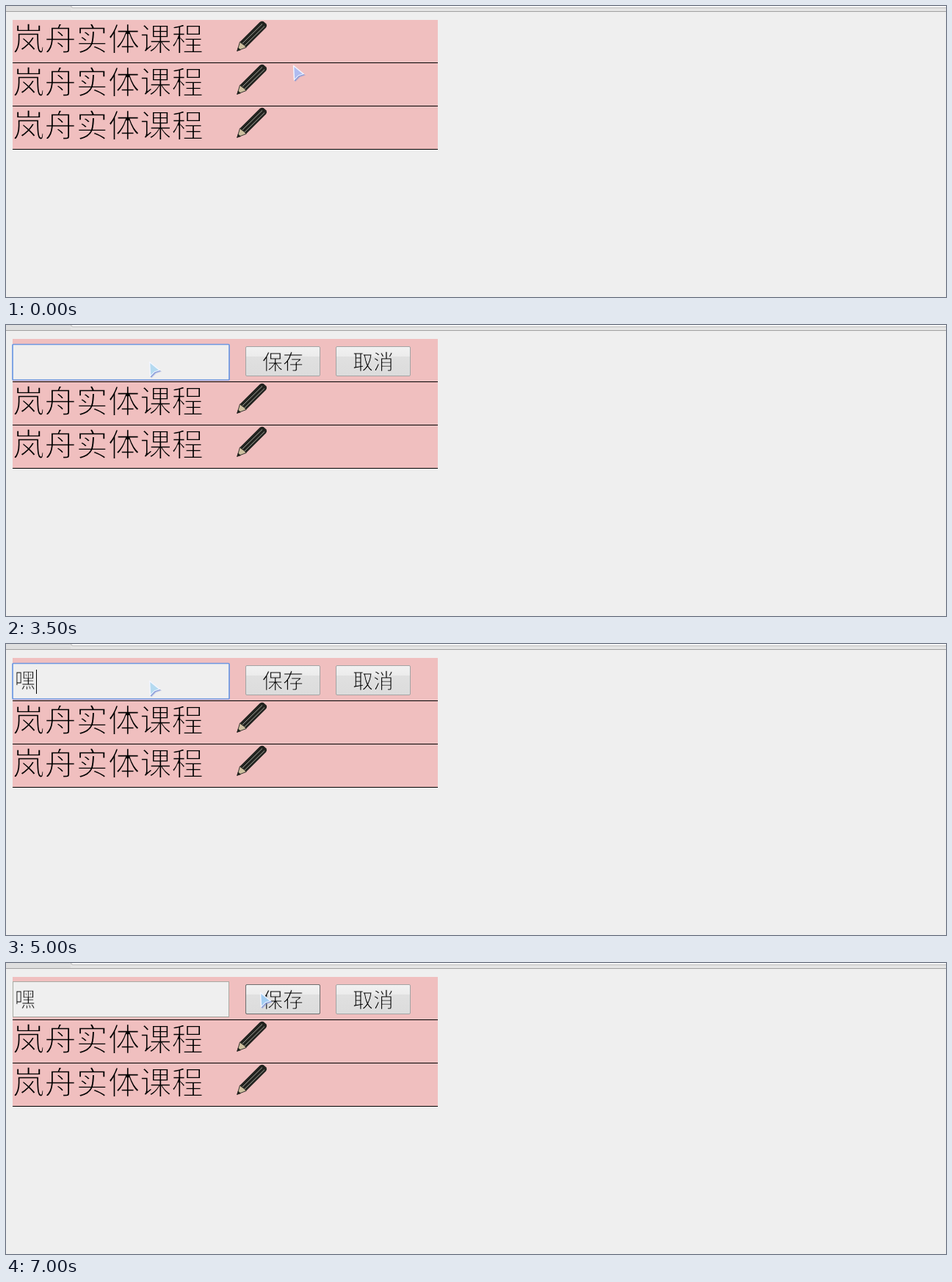
An HTML page that plays this animation: 1280x397 px, repeating every 8000 ms.

```html
<!DOCTYPE html>
<html lang="zh-CN">
<head>
<meta charset="utf-8">
<title>行内编辑</title>
<style>
  html, body { margin: 0; width: 100%; height: 100%; overflow: hidden; background: #efefef; }
  svg { display: block; width: 1280px; height: 397px; }
  text { font-family: "Noto Sans CJK SC", "Noto Sans CJK", sans-serif; font-weight: 300; white-space: pre; }
  /* A stroke in the background colour thins the glyphs */
  .row { font-size: 43.3px; stroke: #f0bfbf; stroke-width: 1.5px; }
  .ui { font-size: 28px; stroke: #e9e9e9; stroke-width: .9px; }
  .cand { font-size: 18.5px; fill: #9a4a17; stroke: #f1bebf; stroke-width: .4px; }
  .tip { font-size: 15px; fill: #ec6467; stroke: #f1bebf; stroke-width: .4px; }
  .latin { font-family: "Liberation Sans", Arial, sans-serif; font-weight: 400; stroke: none; }
  .num { font-family: "Liberation Mono", monospace; font-size: 17px; font-weight: 400; stroke: none; }
  .bold { font-size: 18.7px; font-weight: 700; fill: #ee5458; }
  .first { fill: #e8322f; }

  /* Every layer is switched on a 500 ms grid: 6.25% per step */
  .step { animation: 8s step-end infinite; }
  .layer { visibility: hidden; }
  .view { animation-name: view; }
  .saved { animation-name: saved; }
  .pen { animation-name: pen; }
  .edit { animation-name: edit; }
  .blur { animation-name: blur; }
  .focus { animation-name: focus; }
  .hover { animation-name: hover; }
  .caret { animation-name: caret; }
  .he { animation-name: he; }
  .hei { animation-name: hei; }
  .word { animation-name: word; }
  .ime { animation-name: ime; }
  .cursor { animation-name: cursor; }

  @keyframes view { 0% { visibility: visible } 12.5%, 100% { visibility: hidden } }
  @keyframes saved { 0%, 87.5%, 100% { visibility: hidden } 81.25% { visibility: visible } }
  @keyframes pen { 0%, 81.25% { visibility: visible } 12.5%, 87.5%, 100% { visibility: hidden } }
  @keyframes edit { 0%, 81.25% { visibility: hidden } 12.5%, 87.5%, 100% { visibility: visible } }
  @keyframes blur {
    0%, 25% { visibility: hidden; transform: none }
    12.5% { visibility: visible; transform: none }
    87.5%, 100% { visibility: visible; transform: translateY(-1px) }
  }
  @keyframes focus { 0%, 81.25%, 100% { visibility: hidden } 25% { visibility: visible } }
  @keyframes hover {
    0%, 18.75%, 81.25% { visibility: hidden }
    12.5%, 75%, 87.5%, 100% { visibility: visible }
  }
  @keyframes caret {
    0%, 31.25%, 43.75%, 56.25%, 68.75%, 100% { visibility: hidden; transform: none }
    25%, 37.5% { visibility: visible; transform: none }
    50% { visibility: visible; transform: translateX(31px) }
    62.5% { visibility: visible; transform: translateX(29px) }
  }
  @keyframes he { 0%, 56.25%, 100% { visibility: hidden } 50% { visibility: visible } }
  @keyframes hei { 0%, 62.5%, 100% { visibility: hidden } 56.25% { visibility: visible } }
  @keyframes word {
    0%, 81.25% { visibility: hidden }
    62.5%, 87.5%, 100% { visibility: visible }
  }
  @keyframes ime { 0%, 62.5%, 100% { visibility: hidden } 50% { visibility: visible } }
  @keyframes cursor {
    0% { transform: translate(390px, 80px); fill: #b0bcf0 }
    6.25% { transform: translate(341px, 38px); fill: #b0bcf0 }
    12.5% { transform: translate(341px, 39px); fill: #a3cdf2 }
    18.75% { transform: translate(363px, 45px); fill: #a3cdf2 }
    25% { transform: translate(196px, 49px); fill: #b4daf0 }
    31.25% { transform: translate(194px, 49px); fill: #b4daf0 }
    75% { transform: translate(369px, 39px); fill: #a3cdf2 }
    81.25% { transform: translate(369px, 38px); fill: #b0bcf0 }
    87.5%, 100% { transform: translate(345px, 39px); fill: #a3cdf2 }
  }
</style>
</head>
<body>
<svg viewBox="0 0 1280 397" width="1280" height="397">
  <defs>
    <linearGradient id="face" x2="0" y2="1">
      <stop offset="0" stop-color="#f1f1f1"/>
      <stop offset=".33" stop-color="#ececec"/>
      <stop offset=".33" stop-color="#e0e0e0"/>
      <stop offset="1" stop-color="#dcdcdc"/>
    </linearGradient>
    <g id="pencil">
      <path d="M4.500 29L31.500 2Q34 0 36.500 1L40.500 4.500Q42 7 40 9.500L13 36.500Z" fill="#22231f"/>
      <path d="M35 4.500L8 31M38 7.500L11 34" stroke="#a3a59b" stroke-width="1" fill="none"/>
      <path d="M4.500 29L1 41L13 36.500L10.500 33.500L7.500 31.500Z" fill="#cdbf9f" stroke="#22231f" stroke-width=".9"/>
      <path d="M2 36.500L0 42L6 40Z" fill="#22231f"/>
    </g>
    <path id="heart" d="M0 10C-7 5 -12 1 -12 -4C-12 -11 -3 -12 0 -5C3 -12 12 -11 12 -4C12 1 7 5 0 10Z"/>
  </defs>

  <path d="M0 0H1280V8H0Z" fill="#e5e5e5"/>
  <path d="M0 0H88V7H0Z" fill="#dfdfdf"/>
  <path d="M89 0H1280V2H91Z" fill="#f7f7f7"/>
  <path d="M88.500 0Q88.500 2.500 91 2.500H1280" fill="none" stroke="#bdbdbd"/>
  <path d="M0 7.500H1280" stroke="#a0a0a0"/>

  <path d="M9 19H588V195H9Z" fill="#f0bfbf"/>
  <g class="row">
    <text class="step layer view" x="9" y="61">岚舟实体课程</text>
    <text class="step layer saved" x="9" y="61">嘿</text>
    <text x="9" y="120">岚舟实体课程</text>
    <text x="9" y="179">岚舟实体课程</text>
  </g>
  <path d="M9 77.500H588M9 136.500H588M9 195.500H588" stroke="#000"/>
  <use class="step layer pen" href="#pencil" x="314" y="20"/>
  <use href="#pencil" x="314" y="79"/>
  <use href="#pencil" x="314" y="138"/>

  <g class="step layer edit">
    <rect class="step layer blur" x="9.500" y="26.500" width="294" height="48" fill="#efefef" stroke="#a9aaa3"/>
    <rect class="step layer focus" x="9" y="26.500" width="295" height="48.500" rx="1" fill="#efefef" stroke="#6b97e2" stroke-width="1.700"/>
    <g fill="url(#face)" stroke="#a3a3a3">
      <rect x="326.500" y="29.500" width="101" height="40" rx="1.500"/>
      <rect x="449.500" y="29.500" width="101" height="40" rx="1.500"/>
    </g>
    <rect class="step layer hover" x="326.500" y="29.500" width="101" height="40" rx="1.500" fill="none" stroke="#6e6e6e"/>
    <g class="ui">
      <text x="349" y="61">保存</text>
      <text x="472" y="61">取消</text>
    </g>
  </g>

  <text class="step layer word ui" x="12" y="60">嘿</text>
  <g class="step layer he">
    <text class="ui latin" x="12" y="61">he</text>
    <path d="M12 66.500H43" stroke="#000"/>
  </g>
  <g class="step layer hei">
    <text class="ui latin" x="12" y="61">hei</text>
    <path d="M12 66.500H49" stroke="#000"/>
  </g>
  <path class="step layer caret" d="M12.500 35V68" stroke="#000"/>

  <g class="step layer ime">
    <rect x="34.500" y="109.500" width="445" height="95" rx="46" fill="#f1bebf" stroke="#f0ebc8" stroke-width="7"/>
    <rect x="34.500" y="109.500" width="445" height="95" rx="46" fill="none" stroke="#f0ebc8" stroke-width="9" stroke-dasharray="3 2 1 3 5 2"/>
    <g fill="#f3868a">
      <use href="#heart" transform="translate(55 167) rotate(-8) scale(1.450 1.500)" opacity=".85"/>
      <use href="#heart" transform="translate(79 184) rotate(8) scale(1.080 1.250)" opacity=".7"/>
    </g>
    <g fill="#f25a5e">
      <use href="#heart" transform="translate(44 121) rotate(-14) scale(1.100 1.200)"/>
      <use href="#heart" transform="translate(503 205) rotate(-8) scale(1.050 1.080)"/>
      <g stroke="#f7eeee" stroke-width="3" paint-order="stroke">
        <use href="#heart" transform="translate(485 120) rotate(-10) scale(.62)"/>
        <use href="#heart" transform="translate(484 140) rotate(-6) scale(.64)"/>
      </g>
    </g>
    <use href="#heart" transform="translate(386 136) scale(1.400 1.500)" fill="#f2eeee"/>
    <path d="M442 121C462 121 475 133 475 149C475 160 469 168 461 172C467 182 466 193 459 200H424C417 193 417 182 423 172C414 167 409 159 409 149C409 133 422 121 442 121Z" fill="#f3f0f0"/>
    <g fill="#87696a" stroke="#f7eeee" stroke-width="2" paint-order="stroke" font-size="13">
      <text transform="translate(391 106) rotate(-5)">喜</text>
      <text transform="translate(410 102) rotate(-5)">欢</text>
      <path d="M428 96Q430 93 433 94T438 92" fill="none" stroke="#87696a" stroke-width="1.500"/>
    </g>

    <circle cx="187.500" cy="141" r="6" fill="#f5e2cd" stroke="#c78e6b"/>
    <path d="M187.500 137V138.500M187.500 140V145" stroke="#b0502c" stroke-width="1.500"/>
    <path d="M183 145L181.500 148L186 147Z" fill="#c78e6b"/>
    <text class="tip" x="202" y="146">工具箱(分号)</text>
    <g class="cand">
      <g class="num">
        <text class="first" x="70" y="181">1.</text>
        <text x="124" y="181">2.</text>
        <text x="178" y="181">3.</text>
        <text x="232" y="181">4.</text>
        <text x="286" y="181">5.</text>
      </g>
    </g>
    <path d="M341 175L348 169V181Z" fill="#c98f7a"/>
    <path d="M361 175L354 169V181Z" fill="#6a330b"/>
    <rect x="367.500" y="168.500" width="13" height="13" rx="1" fill="#f5d9c4" stroke="#a86b45"/>
    <path d="M370 173.500H378L374 178Z" fill="#7a3d12"/>
  </g>
  <g class="step layer he">
    <text class="latin bold" x="95" y="147">he</text>
    <path d="M116.500 131V152" stroke="#f01818" stroke-width="1.500"/>
    <g class="cand">
      <text class="first" x="90" y="182">和</text>
      <text x="144" y="182">喝</text>
      <text x="198" y="182">河</text>
      <text x="252" y="182">合</text>
      <text x="306" y="182">何</text>
    </g>
  </g>
  <g class="step layer hei">
    <text class="latin bold" x="95" y="147">hei</text>
    <path d="M120.500 131V152" stroke="#f01818" stroke-width="1.500"/>
    <g class="cand">
      <text class="first" x="90" y="182">黑</text>
      <text x="144" y="182">嘿</text>
      <text x="198" y="182">嗨</text>
      <text x="252" y="182">黒</text>
      <text x="306" y="182">潶</text>
    </g>
  </g>

  <g class="step cursor">
    <path d="M2.500 3L18 14.500L10.500 17L4 23.500Z" fill="#7f8ccf" opacity=".4"/>
    <path d="M1.500 1.500L15.500 13L8.500 15L2.500 21Z" stroke="#f4f6ff" stroke-width="1.400" stroke-linejoin="round"/>
    <path d="M16 13.500L9 15.800L3 22" fill="none" stroke="#7f97d8" stroke-width="1.200"/>
  </g>
</svg>
</body>
</html>
```
